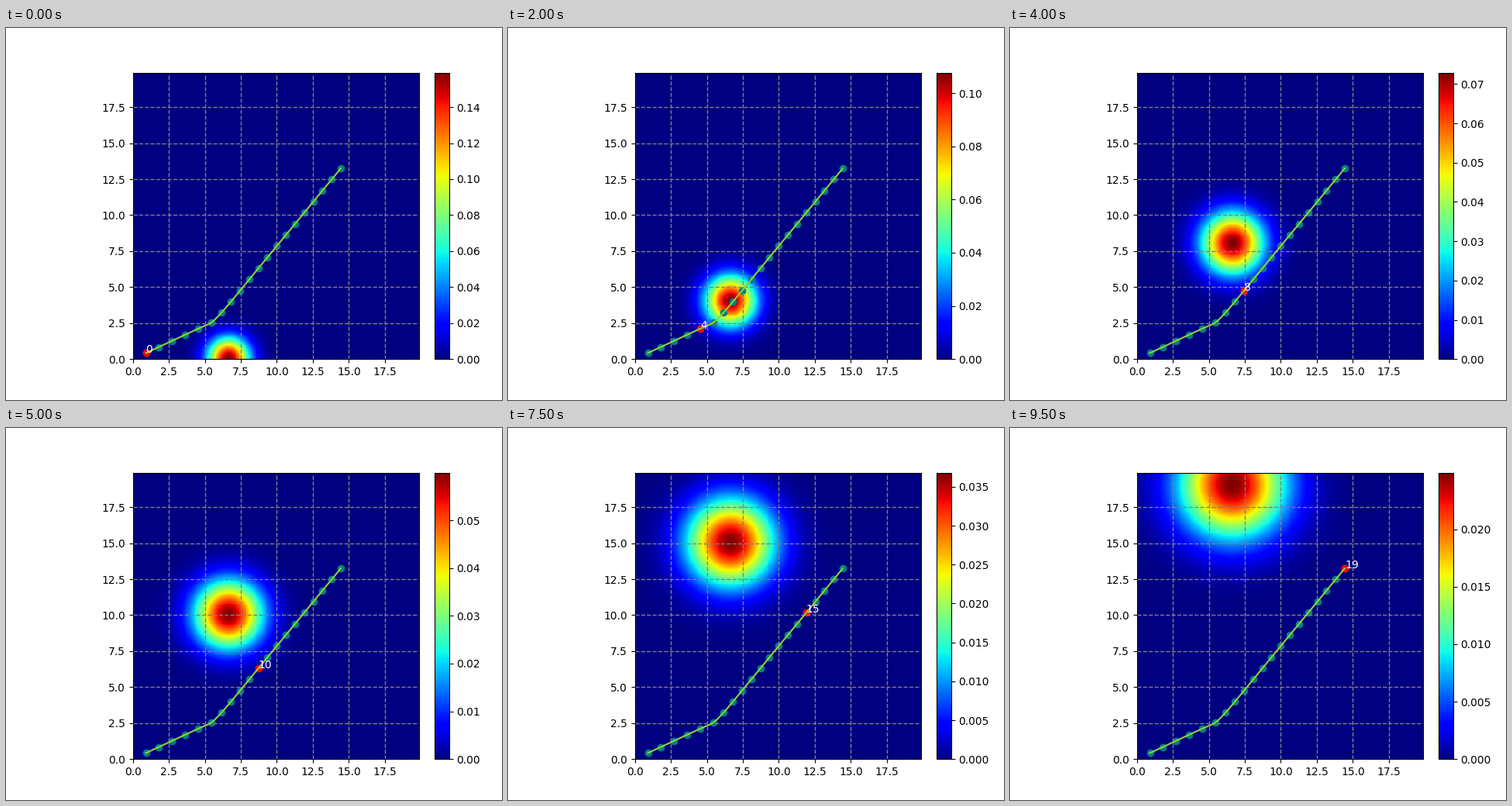
Recreate the animation shown at these times as a matplotlib script. Size 640 px wide and 480 px high, loop 10000 ms.

```python
import numpy as np
import matplotlib.pyplot as plt
from matplotlib.animation import FuncAnimation

STEPS = 20
SPREAD_RATE = 1.05
CENTER_X = 6.6
grid = np.arange(0, 20, 0.1)
X, Y = np.meshgrid(grid, grid)


def density(step):
    """Round Gaussian that rises one unit per step while widening."""
    var = SPREAD_RATE ** (2 * step)
    r2 = (X - CENTER_X) ** 2 + (Y - step) ** 2
    return np.exp(-r2 / (2 * var)) / (2 * np.pi * var)


def smooth(points, samples=12):
    """Cubic Hermite curve through evenly timed points."""
    slopes = np.gradient(points, axis=0)
    u = np.linspace(0, 1, samples, endpoint=False)[:, None]
    parts = [
        (2 * u**3 - 3 * u**2 + 1) * p + (u**3 - 2 * u**2 + u) * m
        + (3 * u**2 - 2 * u**3) * q + (u**3 - u**2) * n
        for p, q, m, n in zip(points, points[1:], slopes, slopes[1:])
    ]
    return np.vstack(parts + [points[-1:]])


# Unit steps: straight, a quick left turn, straight again.
heading = np.radians([25] * 6 + [44, 49.3] + [50.5] * 12)
path = np.cumsum(np.column_stack([np.cos(heading), np.sin(heading)]), axis=0)

fig, ax = plt.subplots(figsize=(6.4, 4.8), dpi=100)
ax.set_aspect("equal")
mesh = ax.pcolormesh(X, Y, density(0)[:-1, :-1], cmap="jet", shading="flat")
ax.set(xlim=(0, grid[-1]), ylim=(0, grid[-1]))
ax.grid(color="gray", linestyle="--", linewidth=1)
fig.colorbar(mesh, ax=ax, fraction=0.046, pad=0.04)

ax.scatter(*path.T, color="teal")
current = ax.scatter(*path[0], color="red")
ax.plot(*smooth(path).T, color="yellowgreen")
label = ax.text(*path[0], "0", color="white")


def update(step):
    values = density(step)[:-1, :-1]
    mesh.set_array(values)
    mesh.set_clim(values.min(), values.max())
    current.set_offsets(path[step])
    label.set_position(path[step])
    label.set_text(str(step))
    return mesh, current, label


anim = FuncAnimation(fig, update, frames=STEPS, interval=500,
                     repeat=True, repeat_delay=0)
plt.show()
```
